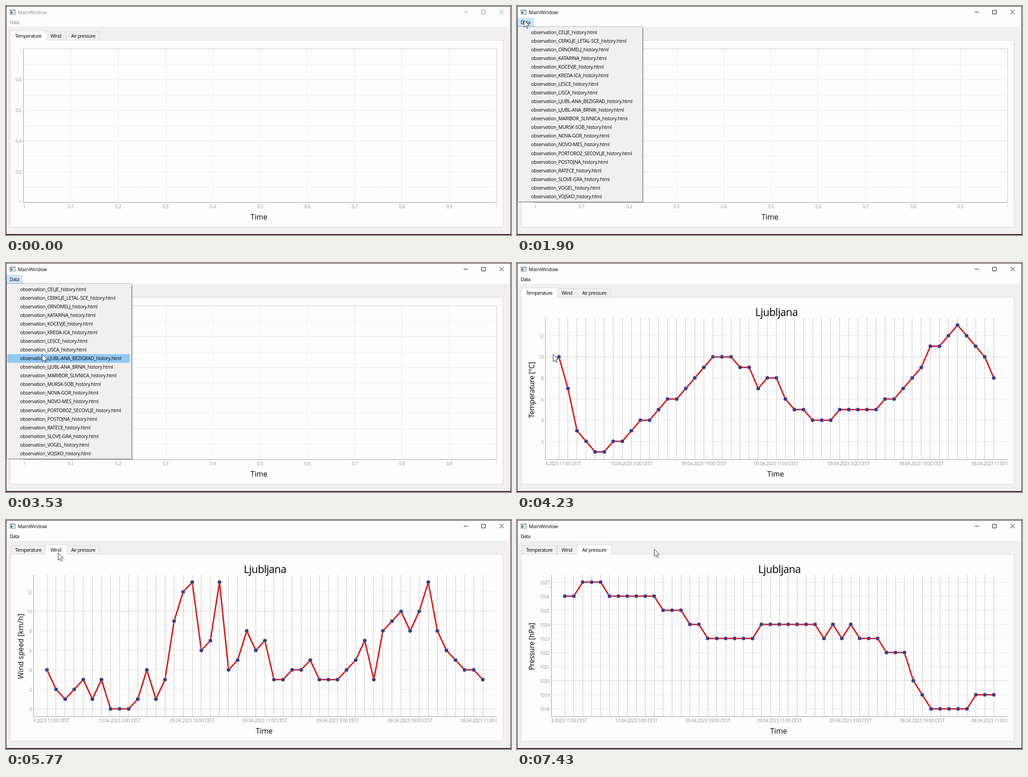
An HTML page with a canvas for the animation above (7.81 s loop, 1109x505 px).

```html
<!DOCTYPE html>
<html lang="en">
<head>
<meta charset="utf-8">
<title>MainWindow</title>
<style>
html, body { margin: 0; width: 100%; height: 100%; overflow: hidden; background: #f0f0f0; }
canvas { display: block; }
</style>
</head>
<body>
<canvas id="stage" width="1109" height="505"></canvas>
<script>
const g = document.getElementById('stage').getContext('2d');
const LOOP = 7810, RIGHT = 1077.5, BOTTOM = 433.5;
const PAPER = '#fdfdfd', FACE = '#f0f0f0', EDGE = '#d9d9d9', GREY = '#969696';

const stations = ['CELJE', 'CERKLJE_LETAL-SCE', 'CRNOMELJ', 'KATARINA', 'KOCEVJE', 'KREDA-ICA',
  'LESCE', 'LISCA', 'LJUBL-ANA_BEZIGRAD', 'LJUBL-ANA_BRNIK', 'MARIBOR_SLIVNICA', 'MURSK-SOB',
  'NOVA-GOR', 'NOVO-MES', 'PORTOROZ_SECOVLJE', 'POSTOJNA', 'RATECE', 'SLOVE-GRA', 'VOGEL', 'VOJSKO'];

const dates = ['10.04.2023 11:00', '10.04.2023 3:00', '09.04.2023 19:00', '09.04.2023 11:00',
  '09.04.2023 3:00', '08.04.2023 19:00', '08.04.2023 11:00'];

const charts = [
  { name: 'Temperature [°C]', gap: -0.28, left: 62.5, mid: 280, step: 2, base: 0,
    data: [10, 7, 3, 2, 1, 1, 2, 2, 3, 4, 4, 5, 6, 6, 7, 8, 9, 10, 10, 10, 9, 9, 7, 8, 8, 6, 5, 5,
      4, 4, 4, 5, 5, 5, 5, 5, 6, 6, 7, 8, 9, 11, 11, 12, 13, 12, 11, 10, 8] },
  { name: 'Wind speed [km/h]', gap: 0.15, left: 60.5, mid: 278.5, step: 2, base: 0,
    data: [4, 2, 1, 2, 3, 1, 3, 0, 0, 0, 1, 4, 1, 3, 9, 12, 13, 6, 7, 13, 4, 5, 8, 6, 7, 3, 3, 4,
      4, 5, 3, 3, 3, 4, 5, 7, 3, 8, 9, 10, 8, 10, 13, 8, 6, 5, 4, 4, 3] },
  { name: 'Pressure [hPa]', gap: -0.3, left: 75.5, mid: 279, step: 1, base: 1018,
    data: [8, 8, 9, 9, 9, 8, 8, 8, 8, 8, 8, 7, 7, 7, 6, 6, 5, 5, 5, 5, 5, 5, 6, 6, 6, 6, 6, 6,
      6, 5, 6, 5, 6, 5, 5, 5, 4, 4, 4, 2, 1, 0, 0, 0, 0, 0, 1, 1, 1] }
];

const tabs = [
  { label: 'Temperature', x: 20, from: 11.5, to: 87.5 },
  { label: 'Wind', x: 98, from: 88.5, to: 132.5 },
  { label: 'Air pressure', x: 143, from: 132.5, to: 205.5 }
];

// Pointer stops: time, x, y
const path = [
  [1000, -12, 27], [1170, 15, 30], [1850, 15, 30], [2130, 17, 38], [2170, 17, 38], [2450, 52, 92],
  [2730, 71, 122], [2970, 71, 122], [3330, 80, 212], [3530, 79, 201], [4570, 79, 201],
  [4730, 81, 103], [4900, 81, 103], [5250, 130, 76], [5500, 114, 72], [6270, 114, 72],
  [6530, 167, 70], [7130, 167, 70], [7430, 301, 64], [LOOP, 301, 64]
];

const clamp = v => Math.max(0, Math.min(1, v));

function pointer(t) {
  const i = path.findIndex(p => p[0] > t);
  if (i < 1) return null;
  const [a, b] = [path[i - 1], path[i]];
  const u = (t - a[0]) / (b[0] - a[0]), e = u * u * (3 - 2 * u);
  return { x: a[1] + (b[1] - a[1]) * e, y: a[2] + (b[2] - a[2]) * e };
}

function text(s, x, y, size, color, align = 'left', gap = 0) {
  g.font = `${size}px "Open Sans", "Noto Sans", sans-serif`;
  g.letterSpacing = gap + 'px';
  g.textAlign = align;
  g.fillStyle = color;
  g.fillText(s, x, y);
}

function box(x, y, w, h, fill, stroke) {
  if (fill) { g.fillStyle = fill; g.fillRect(x, y, w, h); }
  if (stroke) { g.strokeStyle = stroke; g.lineWidth = 1; g.strokeRect(x, y, w, h); }
}

function line(x1, y1, x2, y2, color) {
  g.strokeStyle = color;
  g.lineWidth = 1;
  g.beginPath();
  g.moveTo(x1, y1);
  g.lineTo(x2, y2);
  g.stroke();
}

function clipped(x, y, w, h, draw) {
  g.save();
  g.beginPath();
  g.rect(x, y, w, h);
  g.clip();
  draw();
  g.restore();
}

const tick = (s, x, y, align) => text(s, x, y, 10, GREY, align, -0.33);
const snap = v => Math.floor(v) + 0.5;

function frame(active, menuOpen, hover) {
  box(0, 0, 1109, 505, '#35101f');
  box(1, 1, 1107, 502, FACE);
  box(1, 1, 1107, 44.5, PAPER);
  box(8.5, 8.5, 12, 10, '#f4f4f4', '#8c8c8c');
  box(9, 9, 11, 2, '#b4bac2');
  box(10, 12, 4, 5, '#2f8a78');
  box(16, 12, 3, 5, '#c9d3dc');
  const ink = active ? '#000' : '#8a8a8a';
  text('MainWindow', 26, 17.5, 10.5, ink);
  line(1005, 13.5, 1014, 13.5, ink);
  box(1044.5, 9.5, 8, 8, null, ink);
  line(1084, 9, 1093, 18, ink);
  line(1093, 9, 1084, 18, ink);
  if (menuOpen) box(1.5, 27.5, 34, 17, '#cce8ff', '#99d1ff');
  else if (hover) box(1.5, 27.5, 34, 17, '#e5f3ff', '#cce8ff');
  text('Data', 8, 40, 10.5, ink, 'left', -0.5);
}

function drawTabs(current, p) {
  tabs.forEach((tab, i) => {
    if (i === current) return;
    const over = p && p.x > tab.from && p.x < tab.to && p.y > 56 && p.y < 76;
    box(tab.from, 56.5, tab.to - tab.from, 19, over ? '#d8eaf9' : FACE, EDGE);
    text(tab.label, tab.x, 70, 10.5, '#000', 'left', -0.5);
  });
  box(9.5, 75.5, 1082, 412, PAPER, EDGE);
  const tab = tabs[current], x = tab.from - 2, w = tab.to - tab.from + 3.5;
  box(x, 54.5, w, 21, PAPER, EDGE);
  box(x + 0.5, 75, w - 1, 2, PAPER);
  text(tab.label, tab.x, 69.5, 10.5, '#000', 'left', -0.5);
}

function emptyChart() {
  const left = 38.5, top = 94.5, w = RIGHT - left, h = BOTTOM - top;
  for (let i = 1; i < 10; i++) {
    const x = snap(left + w * i / 10), y = snap(BOTTOM - h * i / 10);
    line(x, top, x, BOTTOM, '#ecece6');
    line(left, y, RIGHT, y, i % 2 ? '#f0f0e2' : '#e6e6e6');
  }
  box(left, top, w, h, null, '#c8c8c8');
  line(left, top, left, BOTTOM, GREY);
  line(left, BOTTOM, RIGHT, BOTTOM, GREY);
  clipped(10, top, 28, h, () => {
    for (let i = 0; i <= 10; i += 2) tick(String(i / 10), 34, BOTTOM - h * i / 10 + 4, 'right');
  });
  clipped(left, BOTTOM, w, 20, () => {
    for (let i = 0; i <= 10; i++) tick(String(i / 10), left + w * i / 10, 446, 'center');
  });
  text('Time', 555.5, 471, 16, '#000', 'center');
}

function chart({ name, gap, left, mid, step, base, data }) {
  const low = Math.min(...data), high = Math.max(...data), x0 = left + 29.5;
  const px = i => x0 + (1047 - x0) * i / (data.length - 1);
  const py = v => 416.5 - (v - low) / (high - low) * 279.5;
  const center = (left + RIGHT) / 2;

  g.strokeStyle = '#e31212';
  g.lineWidth = 3;
  g.lineJoin = 'round';
  g.beginPath();
  data.forEach((v, i) => g.lineTo(px(i), py(v)));
  g.stroke();
  data.forEach((v, i) => {
    g.beginPath();
    g.arc(px(i), py(v), 4, 0, Math.PI * 2);
    g.fillStyle = '#26268c';
    g.fill();
    g.strokeStyle = '#8c8cae';
    g.lineWidth = 1;
    g.stroke();
  });

  data.forEach((v, i) => line(snap(px(i)), 121, snap(px(i)), BOTTOM, 'rgba(150,150,150,.5)'));
  for (let v = Math.ceil(low / step) * step; v <= high; v += step) {
    const y = snap(py(v)), value = v + base;
    line(left, y, RIGHT, y, `rgba(150,150,150,${value % 10 ? 0.18 : 0.42})`);
    tick(String(value), left - 4, y + 4, 'right');
  }
  line(left, 121, left, BOTTOM, GREY);
  line(left, BOTTOM, RIGHT, BOTTOM, GREY);
  clipped(left, BOTTOM, RIGHT - left, 20, () =>
    dates.forEach((d, i) => tick(d + ' CEST', px(i * 8), 446, 'center')));

  text('Ljubljana', center, 117, 23, '#000', 'center', -0.45);
  text('Time', center - 2, 471, 16, '#000', 'center');
  g.save();
  g.translate(38, mid);
  g.rotate(-Math.PI / 2);
  text(name, 0, 0, 16, '#000', 'center', gap);
  g.restore();
}

function menu(alpha, p) {
  g.globalAlpha = alpha;
  box(5, 49, 272.5, 384.5, 'rgba(0,0,0,.3)');
  box(4, 48, 272.5, 384, 'rgba(0,0,0,.35)');
  box(1.5, 45.5, 274, 386, FACE, '#b4b4b4');
  const row = p ? Math.floor((p.y - 48.2) / 19.05) : -1;
  stations.forEach((s, i) => {
    const y = 48.2 + 19.05 * i;
    if (i === row) box(3, Math.round(y), 269, 19, '#91c9f7');
    text(`observation_${s}_history.html`, 31, Math.round(y + 13.6), 10.5, '#000', 'left', -0.27);
  });
  g.globalAlpha = 1;
}

function arrow({ x, y }) {
  g.save();
  g.translate(Math.round(x) + 0.5, Math.round(y) + 0.5);
  g.beginPath();
  [[0, 0], [0, 16], [3.7, 12.5], [6.3, 18], [8.6, 17], [6.2, 11.6], [11.3, 11.3]]
    .forEach(c => g.lineTo(...c));
  g.closePath();
  g.fillStyle = '#fff';
  g.fill();
  g.strokeStyle = '#303030';
  g.lineWidth = 1;
  g.stroke();
  g.restore();
}

function draw(t) {
  const p = pointer(t);
  const pressed = t >= 1500 && t < 4070;
  const overData = p && p.x < 36 && p.y > 26 && p.y < 46;
  const current = t < 5700 ? 0 : t < 7100 ? 1 : 2;
  frame(t >= 70, pressed, overData);
  drawTabs(current, p);
  if (t < 4100) emptyChart();
  else chart(charts[current]);
  const alpha = clamp((t - 1500) / 180) * clamp((3830 - t) / 100);
  if (alpha > 0) menu(alpha, p);
  if (p) arrow(p);
}

const start = performance.now();
function loop() {
  draw((performance.now() - start) % LOOP);
  requestAnimationFrame(loop);
}
loop();
</script>
</body>
</html>
```
